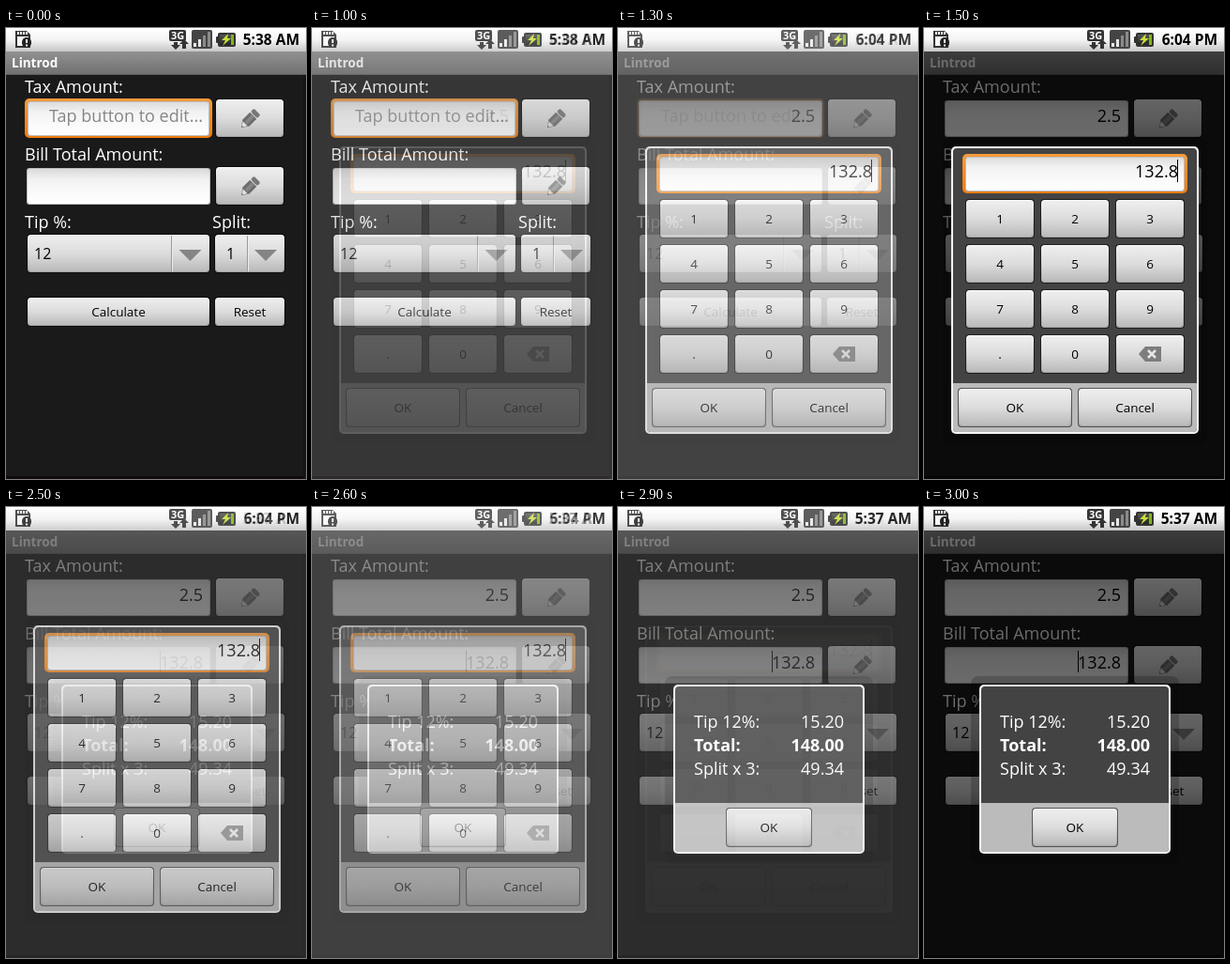
Animation, 320 px wide and 480 px high, one loop 4000 ms. Source, as an HTML page with a canvas:

```html
<!DOCTYPE html>
<html lang="en">
<head>
<meta charset="utf-8">
<title>Tip calculator</title>
<style>
html, body { margin: 0; width: 100%; height: 100%; overflow: hidden; background: #fff; }
canvas { display: block; width: 320px; height: 480px; }
</style>
</head>
<body>
<canvas id="stage" width="320" height="480"></canvas>
<script>
const W = 320, H = 480;
const FAMILY = '"Open Sans", "Noto Sans", sans-serif';
const stage = document.getElementById('stage').getContext('2d');
let c;

function vertical(y, h, ...colors) {
  const g = c.createLinearGradient(0, y, 0, y + h);
  colors.forEach((color, i) => g.addColorStop(i / (colors.length - 1), color));
  return g;
}

function rect(x, y, w, h, fill) {
  c.fillStyle = fill;
  c.fillRect(x, y, w, h);
}

function round(x, y, w, h, r, fill) {
  c.beginPath();
  c.roundRect(x, y, w, h, r);
  c.fillStyle = fill;
  c.fill();
}

function poly(fill, ...points) {
  c.beginPath();
  points.forEach(([x, y]) => c.lineTo(x, y));
  c.closePath();
  c.fillStyle = fill;
  c.fill();
}

function text(value, x, y, size, { color = '#000', align = 'left', weight = 400 } = {}) {
  c.font = `${weight} ${size}px ${FAMILY}`;
  c.textAlign = align;
  c.fillStyle = color;
  c.fillText(value, x, y);
}

function button(x, y, w, h, label) {
  round(x - 1, y - 1, w + 2, h + 2, 4, 'rgba(0,0,0,.55)');
  round(x, y, w, h, 3.5, vertical(y, h, '#fafafa', '#a2a2a2'));
  round(x + 1, y + 1, w - 2, h - 2, 3, vertical(y, h, '#efefef', '#dcdcdc', '#b8b8b8'));
  if (label) text(label, x + w / 2, y + h / 2 + 5, 13.5, { align: 'center' });
}

function field(x, y, w, h, focused) {
  if (focused) round(x - 2, y - 1, w + 4, h + 2, 5, vertical(y, h, '#f59a3c', '#ec7d10'));
  const inset = focused ? 1 : 0;
  round(x + inset, y + inset + 1, w - 2 * inset, h - 2 * inset - 1, 3, '#bdbdbd');
  round(x + inset + 1, y + inset + 2, w - 2 * inset - 2, h - 2 * inset - 3, 3,
    vertical(y, h, '#d6d6d6', '#f2f2f2', '#fafafa', '#fff'));
}

function pencilButton(y) {
  button(224, y, 72, 40);
  c.save();
  c.translate(251, y + 30);
  c.rotate(-Math.PI / 4);
  poly('#6c6c6c', [0, 0], [7, -5], [18, -5], [18, 5], [7, 5]);
  poly('#858585', [7, -2], [18, -2], [18, 2], [7, 2]);
  poly('#dedede', [2, -1], [6, -3.5], [6, 3.5], [2, 1]);
  round(19, -5, 5, 10, 2, '#777');
  c.restore();
}

function spinner(x, w, split, label, labelX) {
  button(x, 220, w, 40);
  rect(split, 221, 1, 38, '#999');
  rect(split + 1, 221, 1, 38, '#ededed');
  const mid = (split + x + w) / 2;
  poly('#858585', [mid - 12, 236], [mid + 12, 236], [mid, 248]);
  text(label, labelX, 246, 16);
}

function statusBar(clock) {
  rect(0, 0, W, 25, vertical(0, 25, '#fff', '#f4f4f4', '#c6c6c6'));

  // memory card
  poly('#333', [10, 3], [22, 3], [26, 7], [26, 21], [10, 21]);
  poly('#f7f7f7', [12, 9], [24, 9], [24, 19], [12, 19]);
  for (let x = 12; x < 22; x += 3) rect(x, 4, 2, 3, '#eee');
  round(17, 10, 10, 11, 5, '#222');
  rect(21, 12, 2, 4, '#fff');
  rect(21, 17.5, 2, 2, '#fff');

  // data connection
  round(174, 2, 18, 12, 2, '#333');
  text('3G', 183, 12, 11, { color: '#fff', align: 'center', weight: 700 });
  poly('#333', [179, 15], [183, 15], [183, 18], [186, 18], [181, 23], [176, 18], [179, 18]);
  poly('#333', [190, 12], [195, 17], [192, 17], [192, 22], [188, 22], [188, 17], [185, 17]);

  // signal
  round(198, 2, 22, 20, 2, '#444');
  for (let i = 0; i < 4; i++) {
    rect(200 + i * 5, 16 - i * 4, 3, 4 + i * 4, i < 2 ? '#e8e8e8' : '#8a8a8a');
  }

  // battery
  round(224, 9, 4, 7, 1, '#333');
  round(226, 5, 19, 15, 2, '#333');
  rect(228, 7, 15, 11, vertical(7, 11, '#555', '#252525'));
  rect(240, 7, 3, 11, '#7db51c');
  poly('#c7df3c', [237, 6], [230, 13], [234, 13], [231, 19], [240, 11], [236, 11]);

  text(clock, 313, 18, 15.5, { align: 'right', weight: 700 });
}

function form({ tax, bill }) {
  rect(0, 25, W, H - 25, '#1a1a1a');
  rect(0, 477, W, 3, '#100a0c');
  rect(317, 50, 3, 430, '#141414');
  rect(0, 25, W, 25, vertical(25, 25, '#929292', '#808080', '#707070'));
  rect(0, 49, W, 1, '#5d5d5d');
  text('Lintrod', 6, 42, 13.5, { color: '#fff', weight: 700 });

  const white = { color: '#fff' };
  text('Tax Amount:', 20, 69, 18, white);
  text('Bill Total Amount:', 20, 141, 18, white);
  text('Tip %:', 20, 213, 18, white);
  text('Split:', 220, 213, 18, white);

  field(22, 76, 196, 40, !tax);
  if (tax) text(tax, 210, 100, 18, { align: 'right' });
  else text('Tap button to edit...', 210, 100, 18, { color: '#858585', align: 'right' });
  field(22, 148, 196, 40);
  if (bill) {
    text(bill, 210, 172, 18, { align: 'right' });
    rect(164, 153, 1, 23, '#000');
  }
  pencilButton(76);
  pencilButton(148);
  spinner(23, 194, 176, '12', 30);
  spinner(223, 74, 257, '1', 235);
  button(23, 287, 194, 30, 'Calculate');
  button(223, 287, 74, 30, 'Reset');
}

function dialog(x, y, w, h, barY) {
  rect(0, 25, W, H - 25, 'rgba(0,0,0,.58)');
  round(x - 9, y - 9, w + 18, h + 20, 8, 'rgba(0,0,0,.2)');
  round(x, y, w, h, 5, '#f4f4f4');
  round(x + 2, y + 2, w - 4, h - 4, 4, '#434343');
  round(x + 2, barY, w - 4, y + h - 2 - barY, [0, 0, 4, 4], '#bbb');
}

function keypad() {
  dialog(29, 126, 264, 306, 378);
  field(43, 135, 236, 40, true);
  text('132.8', 271, 159, 18, { align: 'right' });
  rect(270, 140, 1, 24, '#000');
  [...'123456789.0'].forEach((key, i) =>
    button(45 + (i % 3) * 80, 183 + Math.floor(i / 3) * 48, 72, 40, key));
  button(205, 327, 72, 40);
  poly('#7d7d7d', [229, 347], [236, 339], [253, 339], [253, 355], [236, 355]);
  c.strokeStyle = '#e6e6e6';
  c.lineWidth = 2.5;
  c.beginPath();
  c.moveTo(239, 343); c.lineTo(247, 351);
  c.moveTo(247, 343); c.lineTo(239, 351);
  c.stroke();
  button(37, 384, 120, 40, 'OK');
  button(165, 384, 120, 40, 'Cancel');
}

function summary() {
  dialog(59, 189, 204, 180, 315);
  [['Tip 12%:', '15.20'], ['Total:', '148.00'], ['Split x 3:', '49.34']].forEach(([label, value], i) => {
    const style = { color: '#fff', weight: i === 1 ? 700 : 400 };
    text(label, 81, 235 + i * 25, 18, style);
    text(value, 241, 235 + i * 25, 18, { ...style, align: 'right' });
  });
  button(116, 321, 90, 40, 'OK');
}

function screen(clock, values, overlay) {
  const canvas = document.createElement('canvas');
  canvas.width = W;
  canvas.height = H;
  c = canvas.getContext('2d');
  form(values);
  if (overlay) overlay();
  statusBar(clock);
  return canvas;
}

const screens = [
  screen('5:38 AM', {}),
  screen('6:04 PM', { tax: '2.5' }, keypad),
  screen('5:37 AM', { tax: '2.5', bill: '132.8' }, summary)
];

function layer(image, alpha) {
  stage.globalAlpha = alpha;
  stage.drawImage(image, 0, 0);
}

// Both screens are translucent over white, so fades brighten midway.
function draw(now) {
  const t = now % 4000;
  const index = t < 1000 ? 0 : t < 2500 ? 1 : 2;
  const start = [0, 1000, 2500][index];
  const mix = index ? Math.min(1, (Math.floor((t - start) / 100) + 1) / 6) : 1;
  stage.globalAlpha = 1;
  stage.fillStyle = '#fff';
  stage.fillRect(0, 0, W, H);
  if (mix < 1) layer(screens[index - 1], 1 - mix);
  layer(screens[index], mix);
}

const begin = performance.now();
function tick() {
  draw(performance.now() - begin);
  requestAnimationFrame(tick);
}
tick();
</script>
</body>
</html>
```
